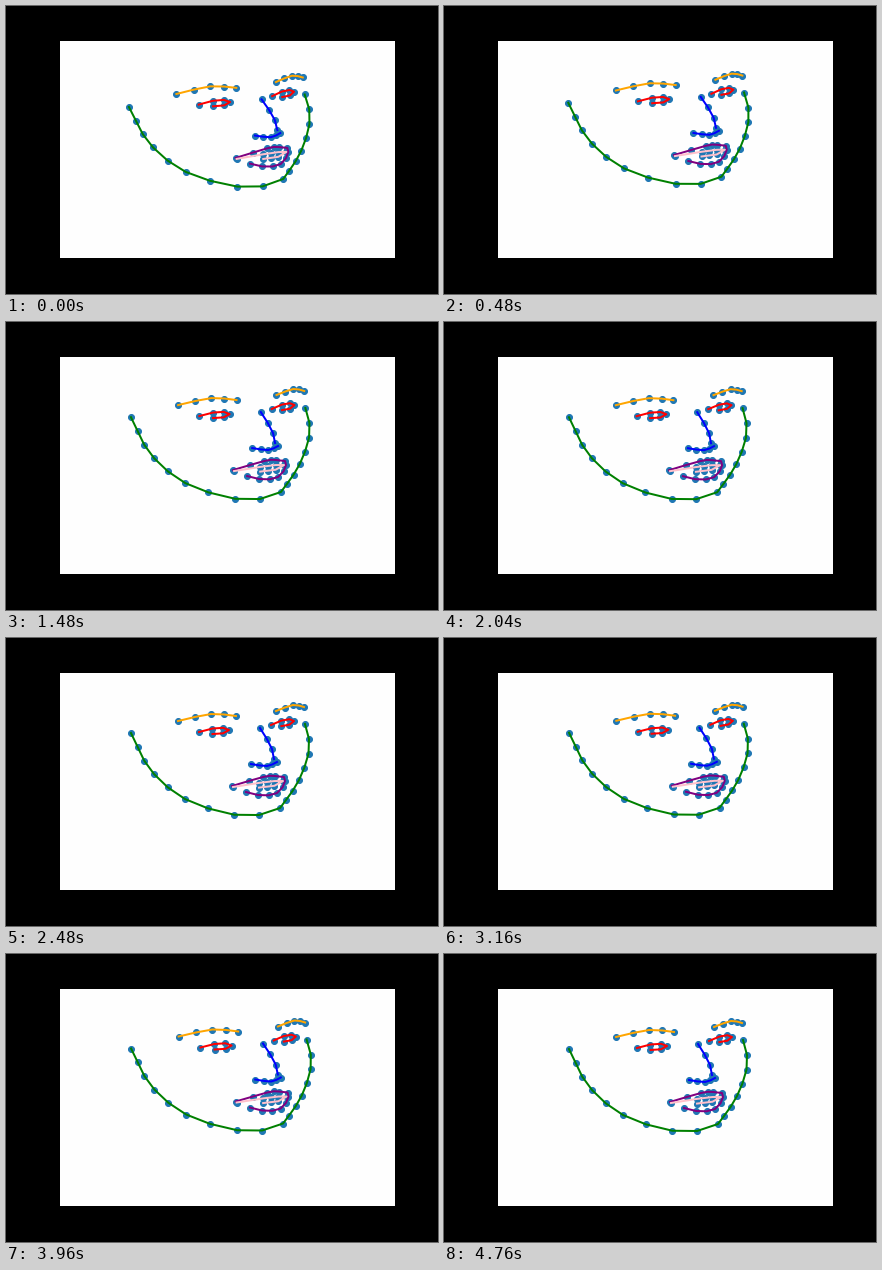
Write a matplotlib script that moves like this. It is 432 px wide and 288 px high and loops after 4800 ms.

```python
import numpy as np
import matplotlib.pyplot as plt
from matplotlib.animation import FuncAnimation

W, H, DPI = 432, 288, 72
N_FRAMES, STEP_MS = 120, 40


def curve(keys, values, at):
    """Cubic Hermite curve through values placed at keys."""
    keys, values = np.array(keys), np.array(values, float)
    values = values.reshape(len(keys), -1)
    slopes = np.gradient(values, keys, axis=0)
    k = np.clip(np.searchsorted(keys, at, side="right") - 1, 0, len(keys) - 2)
    span = np.diff(keys)[k][:, None]
    t = (at - keys[k])[:, None] / span
    return ((1 + 2 * t) * (1 - t) ** 2 * values[k]
            + t * t * (3 - 2 * t) * values[k + 1]
            + t * (1 - t) ** 2 * span * slopes[k]
            + t * t * (t - 1) * span * slopes[k + 1])


def stroke(points):
    """Landmarks by number, with the numbers left out filled in smoothly."""
    return curve(list(points), list(points.values()),
                 np.arange(max(points) + 1))


def ring(a, b, fractions, up, down):
    """Corner a, upper rim, corner b, lower rim back towards a."""
    f = np.array([0, *fractions, 1, *fractions[::-1]])
    n = len(fractions)
    lift = np.array([0] + [-up] * n + [0] + [down] * n)
    points = np.outer(1 - f, a) + np.outer(f, b)
    points[:, 1] += lift
    return points


EYE = dict(fractions=(0.45, 0.8), up=2.6, down=2.9)

FACE = [
    ("green", stroke({0: (125, 95), 3: (148, 136), 5: (179, 161),
                      8: (253, 177), 9: (274, 170), 10: (280, 162),
                      12: (293, 142), 15: (303, 101), 16: (299, 86)})),
    ("orange", stroke({0: (172, 83), 2: (205, 76), 4: (230, 78)})),
    ("orange", stroke({0: (270, 73), 2: (287, 67), 4: (298, 69)})),
    ("blue", stroke({0: (254, 90), 2: (266, 111), 3: (268, 121)})),
    ("blue", stroke({0: (245, 126), 2: (261, 128), 4: (271, 124)})),
    ("red", ring((193, 94), (223, 92), **EYE)),
    ("red", ring((265, 87), (288, 83), **EYE)),
    ("purple", stroke({0: (226, 148), 2: (257, 139), 4: (269, 138),
                       5: (278, 139), 6: (279, 143), 8: (271, 155),
                       10: (252, 157), 11: (240, 154)})),
    ("pink", ring((227, 149), (277, 143), (0.52, 0.68, 0.83), 1, 3.7)),
]

# How far the head is turned, at a few frames of the loop
TURNS = {0: 1.3, 24: 1, 51: -0.25, 62: 0, 79: 0.5, 99: 1, 119: 0}
turn = curve(list(TURNS), list(TURNS.values()), np.arange(N_FRAMES))[:, 0]


def pose(points, i):
    """Turn the head; early on it also rises from a low, tilted pose."""
    x, y = points.T
    depth = 4.3 * np.exp(-((x - 250) / 65) ** 2 - ((y - 135) / 75) ** 2)
    settle = np.exp(-i / 12)
    tilt = 0.02 * settle
    dx = turn[i] * depth - 1.9 * settle + tilt * (y - 110)
    dy = 4.6 * settle - 0.5 * turn[i] - tilt * (x - 225)
    return np.column_stack([x + dx, y + dy])


fig = plt.figure(figsize=(W / DPI, H / DPI), dpi=DPI, facecolor="black")
ax = fig.add_axes([0.125, 0.125, 0.775, 0.755], facecolor="#fefefe")
ax.set(xlim=(0.125 * W, 0.9 * W), ylim=(0.875 * H, 0.12 * H),
       xticks=[], yticks=[])
ax.spines[:].set_visible(False)

lines = [ax.plot([], [], color=color, lw=2)[0] for color, _ in FACE]
dots = ax.scatter([], [], s=36, color="#1f77b4", zorder=1)


def draw(i):
    posed = [pose(points, i) for _, points in FACE]
    for line, points in zip(lines, posed):
        line.set_data(*points.T)
    dots.set_offsets(np.vstack(posed))
    return [dots, *lines]


anim = FuncAnimation(fig, draw, frames=N_FRAMES, interval=STEP_MS,
                     repeat=True, repeat_delay=0)
plt.show()
```
